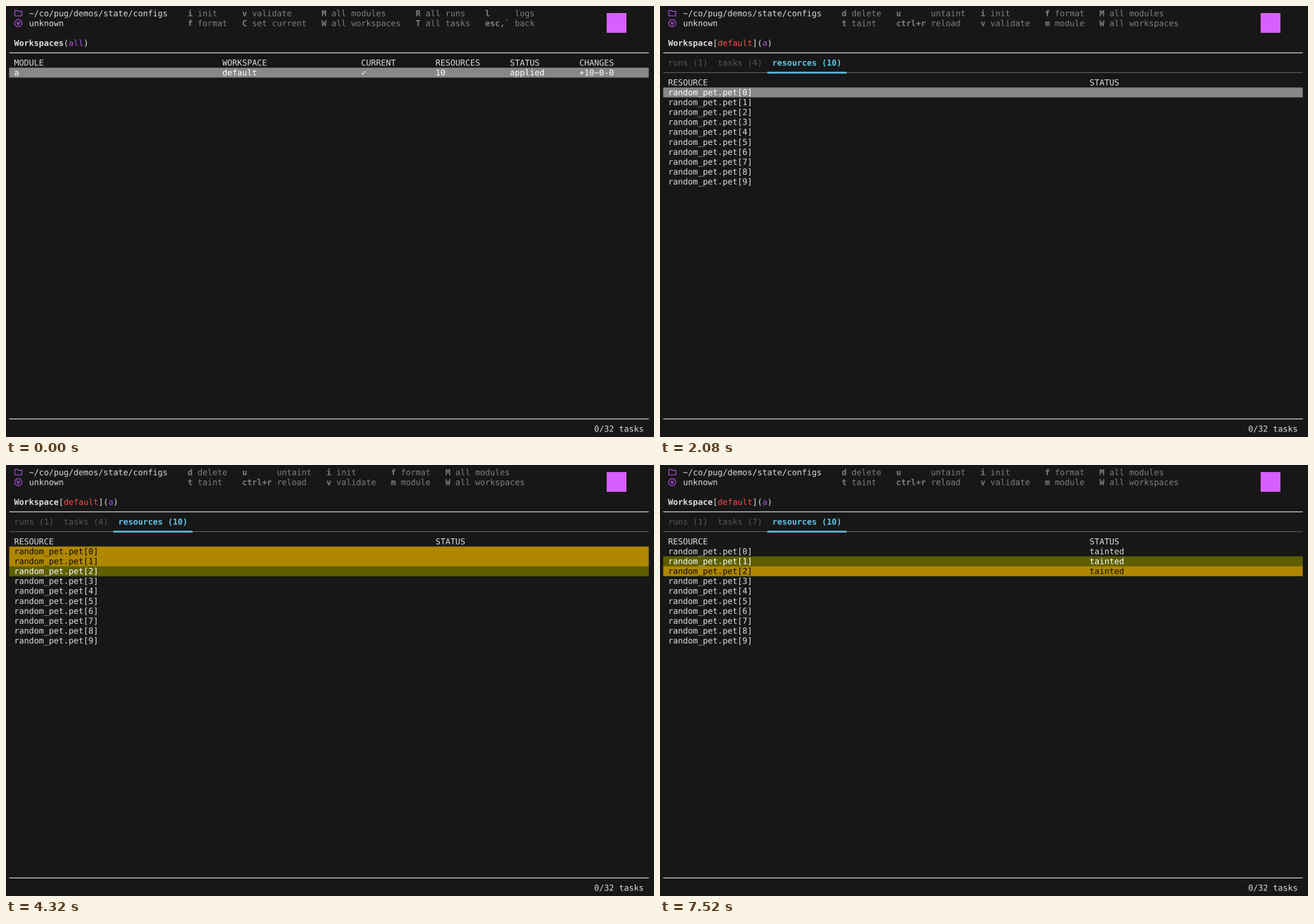
Animation of 917 by 611 pixels, one loop 8 s. Source, as an HTML page with a canvas:

```html
<!DOCTYPE html>
<html lang="en">
<head>
<meta charset="utf-8">
<title>Terminal workspace demo</title>
<style>
html, body { margin: 0; width: 100%; height: 100%; overflow: hidden; background: #171717; }
canvas { display: block; width: 917px; height: 611px; }
</style>
</head>
<body>
<canvas id="stage"></canvas>
<script>
const W = 917, H = 611, LOOP = 8000;
const X0 = 4.5, Y0 = 3.3, CW = 7.016, RH = 14.027, COLS = 129;
const FONT = '11.65px "DejaVu Sans Mono", "Noto Sans Mono", monospace';
const C = {
  bg: '#171717', text: '#dddddd', white: '#ffffff', key: '#808080', dim: '#585858',
  purple: '#b04fe0', logo: '#d75fff', red: '#f65351', blue: '#63c5ea', rule: '#d0d0d0',
  cursor: '#888888', picked: '#af8700', both: '#5f5f00', black: '#080808'
};

// Drawn at double size, so that parts of a pixel are kept.
const canvas = document.getElementById('stage');
const scale = 2 * (window.devicePixelRatio || 1);
canvas.width = Math.round(W * scale);
canvas.height = Math.round(H * scale);
const g = canvas.getContext('2d');
g.scale(scale, scale);
g.textRendering = 'geometricPrecision';

const colX = c => X0 + c * CW;
const rowY = r => Y0 + r * RH;

// Writes words on the terminal grid.
function put(col, row, str, color = C.text, bold = false) {
  g.font = (bold ? 'bold ' : '') + FONT;
  g.fillStyle = color;
  for (const m of str.matchAll(/\S+/g)) {
    g.fillText(m[0], colX(col + m.index), rowY(row) + 11.1);
  }
}

function bar(row, color) {
  g.fillStyle = color;
  g.fillRect(X0, rowY(row), COLS * CW, RH);
}

function rule(row, color, col = 0, cols = COLS, weight = 1.2) {
  g.fillStyle = color;
  g.fillRect(colX(col), rowY(row) + (RH - weight) / 2, cols * CW, weight);
}

// Each cell is [column, text].
function line(row, cells, color) {
  for (const [col, str] of cells) put(col, row, str, color);
}

// Key help in pairs, two rows per column.
function help(list) {
  let col = 36;
  for (let i = 0; i < list.length; i += 2) {
    const pair = list.slice(i, i + 2).map(s => [s.split(' ')[0], s.slice(s.indexOf(' ') + 1)]);
    const keyW = Math.max(...pair.map(p => p[0].length));
    const descW = Math.max(...pair.map(p => p[1].length));
    pair.forEach(([key, desc], r) => {
      put(col, r, key, C.key, true);
      put(col + keyW + 1, r, desc, C.key);
    });
    col += keyW + descW + 4;
  }
}

function path(points, closed) {
  g.beginPath();
  for (const [x, y] of points) g.lineTo(x, y);
  if (closed) g.closePath();
  g.stroke();
}

function icons() {
  g.strokeStyle = C.purple;
  g.lineJoin = 'round';
  g.lineWidth = 1.1;
  path([[12.5, 6.3], [16, 6.3], [17.2, 7.6], [22.3, 7.6], [22.3, 14], [12.5, 14]], true);
  g.beginPath();
  g.arc(17.3, 24.3, 5, 0, Math.PI * 2);
  g.stroke();
  g.lineWidth = 1.5;
  path([[15.3, 22.3], [17.3, 26.4], [19.3, 22.3]]);
}

function frame(keys, busy = 0) {
  g.fillStyle = C.bg;
  g.fillRect(0, 0, W, H);
  icons();
  put(4, 0, '~/co/pug/demos/state/configs');
  put(4, 1, 'unknown');
  help(keys);
  g.fillStyle = C.logo;
  g.fillRect(850, 10, 28, 28);
  rule(4, C.rule);
  rule(41, C.rule);
  put(118, 42, busy + '/32 tasks');
}

function tabs(active, taskCount) {
  put(1, 3, 'Workspace', C.text, true);
  put(10, 3, '[');
  put(11, 3, 'default', C.red);
  put(18, 3, '](');
  put(20, 3, 'a', C.purple);
  put(21, 3, ')');
  rule(6, C.dim);
  let col = 0;
  ['runs (1)', `tasks (${taskCount})`, 'resources (10)'].forEach((name, i) => {
    const on = i === active, cols = name.length + 2;
    put(col + 1, 5, name, on ? C.blue : C.dim, on);
    if (on) rule(6, C.blue, col, cols, 2.4);
    col += cols;
  });
}

function workspaces() {
  frame(['i init', 'f format', 'v validate', 'C set current', 'M all modules', 'W all workspaces',
    'R all runs', 'T all tasks', 'l logs', 'esc,` back']);
  put(1, 3, 'Workspaces', C.text, true);
  put(11, 3, '(');
  put(12, 3, 'all', C.purple);
  put(15, 3, ')');
  bar(6, C.cursor);
  line(5, [[1, 'MODULE'], [43, 'WORKSPACE'], [71, 'CURRENT'], [86, 'RESOURCES'], [101, 'STATUS'], [115, 'CHANGES']]);
  line(6, [[1, 'a'], [43, 'default'], [71, '✓'], [86, '10'], [101, 'applied'], [115, '+10~0-0']], C.white);
}

function runs() {
  frame(['p plan', 'a apply', 'c cancel', 'i init', 'v validate', 'f format',
    'm module', 'M all modules', 'W all workspaces', 'R all runs']);
  tabs(0, 4);
  bar(8, C.cursor);
  line(7, [[1, 'STATUS'], [15, 'CHANGES'], [67, 'AGE'], [79, 'ID']]);
  line(8, [[1, 'applied'], [15, '+10~0-0'], [67, '3s ago'], [79, 'run-7tkZ2uKzxyxJVZhYxv7JZj']], C.white);
}

const JOBS = [
  ['state pull', '3s ago', 'task-4GmWc8RtyqLxVn2KzPd7Hs'],
  ['apply', '4s ago', 'task-9vNbQ3XfhTzJk5MwYr2CuE'],
  ['plan', '6s ago', 'task-2HsLp7DgnVxRt8KqZb4WyA'],
  ['init', '8s ago', 'task-6KjTf3MzcYwPv9NhXd5GrB']
];

function taskList() {
  frame(['c cancel', 'i init', 'v validate', 'f format', 'm module', 'M all modules',
    'W all workspaces', 'R all runs']);
  tabs(1, 4);
  bar(8, C.cursor);
  line(7, [[1, 'COMMAND'], [73, 'STATUS'], [85, 'AGE'], [97, 'ID']]);
  JOBS.forEach(([cmd, age, id], i) => {
    line(8 + i, [[1, cmd], [73, 'exited'], [85, age], [97, id]], i ? C.text : C.white);
  });
}

// Cursor moves, picks and taint progress as they stand at time t.
function resourceState(t) {
  const s = { cursor: 0, picked: [], tainted: 0, tainting: false };
  if (t >= 3120) s.picked = [0];
  if (t >= 3640) s.cursor = 1;
  if (t >= 3680) s.picked = [0, 1];
  if (t >= 4280) s.cursor = 2;
  if (t >= 4320) s.picked = [0, 1, 2];
  if (t >= 4840) {
    s.picked = [];
    s.tainting = true;
    s.tainted = t >= 5000 ? 3 : t >= 4920 ? 2 : t >= 4880 ? 1 : 0;
  }
  if (t >= 6880) s.picked = [2];
  if (t >= 7440) s.cursor = 1;
  if (t >= 7520) s.picked = [1, 2];
  return s;
}

function resources(t) {
  const s = resourceState(t);
  frame(['d delete', 't taint', 'u untaint', 'ctrl+r reload', 'i init', 'v validate',
    'f format', 'm module', 'M all modules', 'W all workspaces'], s.tainting ? 3 - s.tainted : 0);
  tabs(2, s.tainting ? 7 : 4);
  for (const i of s.picked) bar(8 + i, C.picked);
  bar(8 + s.cursor, s.picked.includes(s.cursor) ? C.both : C.cursor);
  line(7, [[1, 'RESOURCE'], [86, 'STATUS']]);
  for (let i = 0; i < 10; i++) {
    const color = i === s.cursor ? C.white : s.picked.includes(i) ? C.black : C.text;
    put(1, 8 + i, `random_pet.pet[${i}]`, color);
    if (s.tainting && i < 3) put(86, 8 + i, i < s.tainted ? 'tainted' : 'tainting', color);
  }
  if (t >= 5000 && t < 6880) {
    put(1, 42, 'completed taint tasks: (3 successful; 0 errored; 0 canceled; 0 uncreated)', '#000000', true);
  }
}

function draw(t) {
  if (t < 960) workspaces();
  else if (t < 1520) runs();
  else if (t < 2080) taskList();
  else resources(t);
}

const start = performance.now();
function tick() {
  draw((performance.now() - start) % LOOP);
  requestAnimationFrame(tick);
}
draw(0);
requestAnimationFrame(tick);
</script>
</body>
</html>
```
